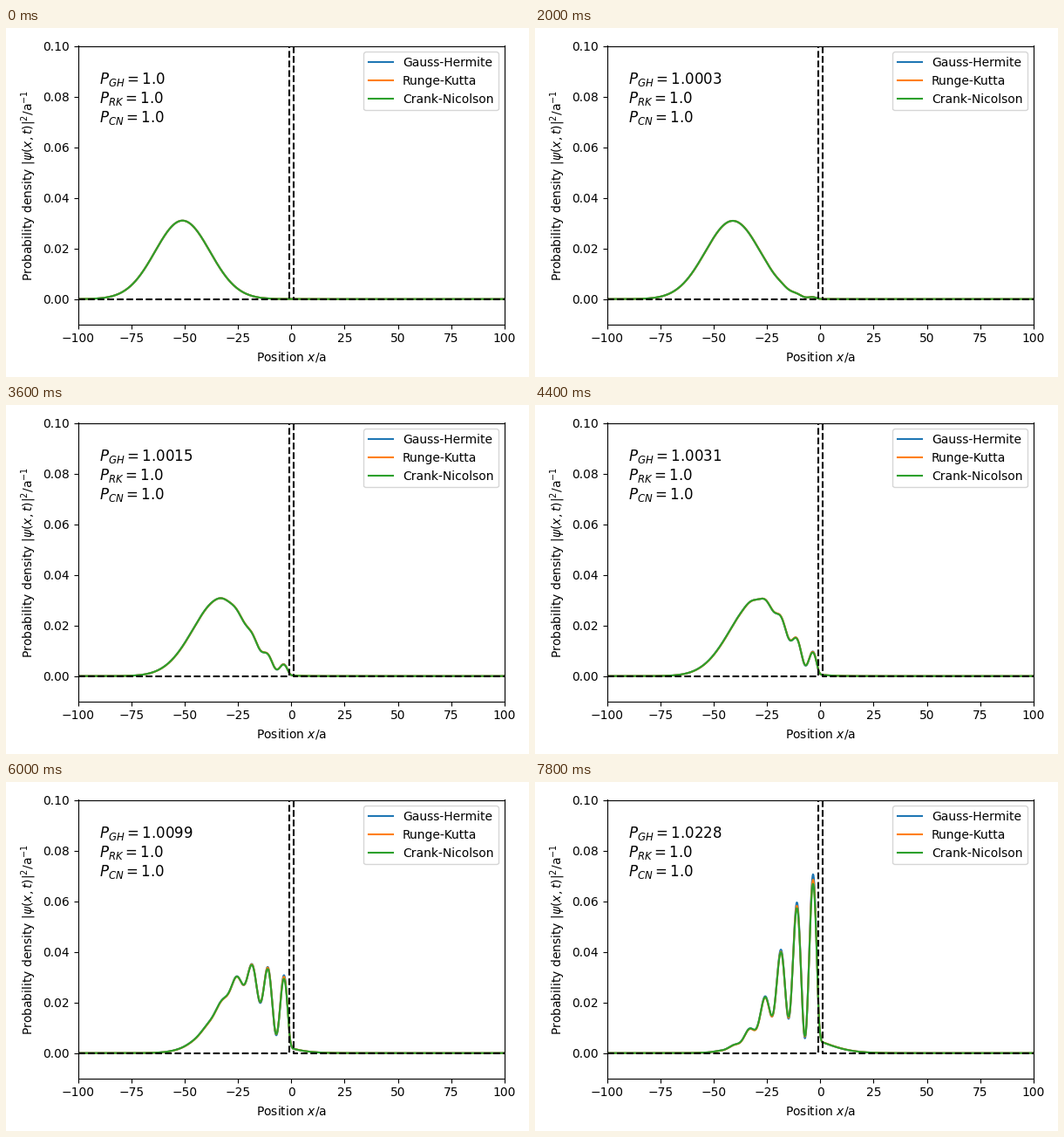
Recreate the animation shown at these times as a matplotlib script. Size 600 by 400 pixels, loop 8 s.

```python
import numpy as np
import matplotlib.pyplot as plt
from matplotlib.animation import FuncAnimation

FRAMES, INTERVAL = 40, 200
DT = 2.5                      # time units per frame
X0, K0, SIGMA = -51.0, 0.4, 12.87
V0, HALF = 0.28, 1.0          # barrier height and half width

x = np.linspace(-100, 100, 1001)
k = np.linspace(K0 - 0.23, K0 + 0.23, 220)
packet = (2 * SIGMA**2 / np.pi) ** 0.25 * np.exp(-(SIGMA * (k - K0)) ** 2 - 1j * k * X0)
packet = packet * (k[1] - k[0]) / np.sqrt(2 * np.pi)


def scattering_modes(gain):
    """Stationary barrier states; gain scales the reflected wave."""
    q = np.sqrt(2 * V0 - k**2)
    a = 2 * HALF
    ch, sh = np.cosh(q * a), np.sinh(q * a)
    t = np.exp(-1j * k * a) / (ch + 1j * (q**2 - k**2) / (2 * k * q) * sh)
    exit_wave = t * np.exp(1j * k * HALF)
    entry = exit_wave * (ch - 1j * k / q * sh)
    r = (entry - np.exp(-1j * k * HALF)) * np.exp(-1j * k * HALF)

    xs = x[:, None]
    wave = np.exp(1j * k * xs)
    u = np.clip(xs - HALF, -a, 0)
    inside = exit_wave * (np.cosh(q * u) + 1j * k / q * np.sinh(q * u))
    left = wave + gain * r * np.conj(wave)
    return np.where(xs < -HALF, left, np.where(xs > HALF, t * wave, inside))


# name, reflection gain, relative speed
METHODS = [("Gauss-Hermite", 1.07, 1.0),
           ("Runge-Kutta", 1.015, 1.005),
           ("Crank-Nicolson", 1.0, 1.0)]
modes = [scattering_modes(gain) for _, gain, _ in METHODS]

# growth of the Gauss-Hermite norm, smooth on a log scale
growth = np.polyfit([3, 10, 18, 26, 34, 39],
                    np.log([7e-5, 3e-4, 1.5e-3, 5.8e-3, 1.53e-2, 2.28e-2]), 5)


def density(i, n):
    t = n * DT * METHODS[i][2]
    return np.abs(modes[i] @ (packet * np.exp(-0.5j * k**2 * t))) ** 2


def norm_label(name, value):
    return f"$P_{{{name}}}={round(float(value), 4)}$"


fig, ax = plt.subplots(figsize=(6, 4), dpi=100)
lines = [ax.plot(x, density(i, 0), label=m[0])[0] for i, m in enumerate(METHODS)]
ax.plot([-100, -HALF, -HALF, HALF, HALF, 100], [0, 0, V0, V0, 0, 0], "k--")
gh_text = ax.text(-90, 0.085, norm_label("GH", 1), fontsize=12)
ax.text(-90, 0.0775, norm_label("RK", 1), fontsize=12)
ax.text(-90, 0.07, norm_label("CN", 1), fontsize=12)
ax.set_xlim(-100, 100)
ax.set_ylim(-0.01, 0.1)
ax.set_xlabel("Position $x$/a")
ax.set_ylabel(r"Probability density $|\psi(x,t)|^2$/a$^{-1}$")
ax.legend(loc="upper right")
fig.tight_layout()


def update(n):
    for i, line in enumerate(lines):
        line.set_ydata(density(i, n))
    gh_text.set_text(norm_label("GH", 1 + np.exp(np.polyval(growth, n))))
    return [*lines, gh_text]


anim = FuncAnimation(fig, update, frames=FRAMES, interval=INTERVAL,
                     repeat=True, repeat_delay=0)
plt.show()
```
